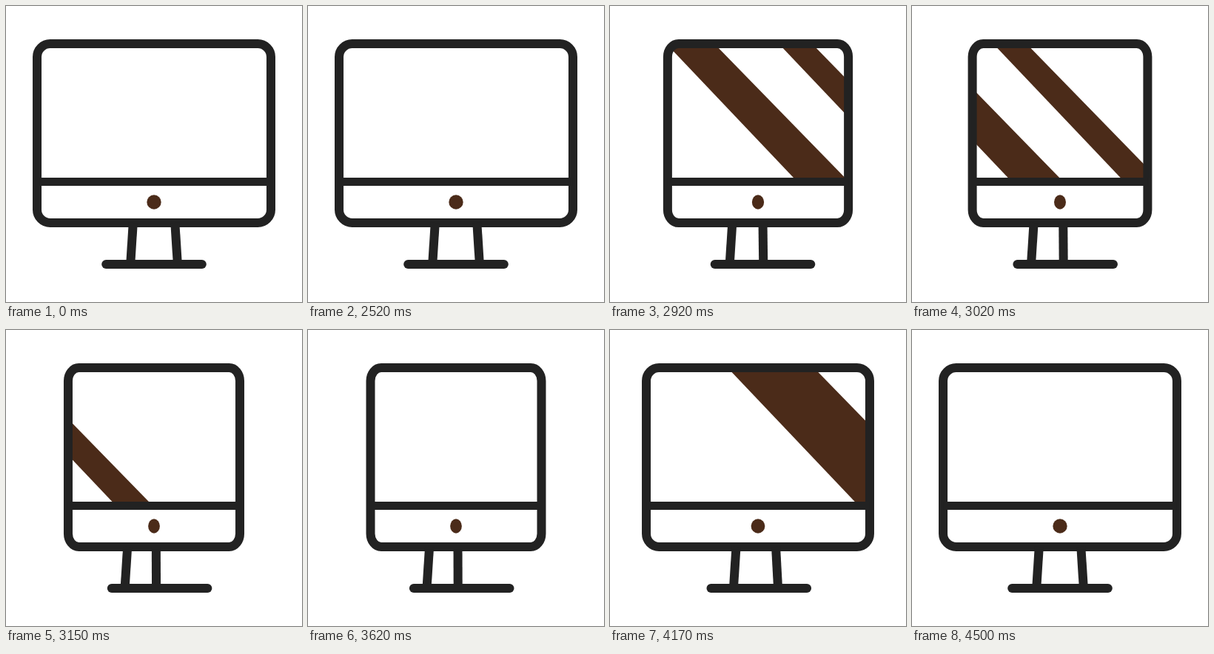
An HTML page with a canvas for the animation above (4520 ms loop, 400 by 400 pixels).

```html
<!DOCTYPE html>
<html>
<head>
<meta charset="utf-8">
<style>
html, body { margin: 0; width: 100%; height: 100%; overflow: hidden; background: #fff; }
canvas { display: block; width: 400px; height: 400px; }
</style>
</head>
<body>
<canvas id="stage" width="400" height="400"></canvas>
<script>
const ctx = document.getElementById('stage').getContext('2d');
const LOOP = 4520, DARK = '#222222', BROWN = '#4b2b19';
const TOP = 51, DIVIDER = 237.5, BOTTOM = 293, FOOT = 349;

const progress = (t, start, length) => Math.min(1, Math.max(0, (t - start) / length));
const smooth = s => s * s * (3 - 2 * s);
const mix = (a, b, k) => a + (b - a) * k;

// Quick start, long settle: cubic-bezier(.25, 0, .2, 1)
function settle(x) {
  let lo = 0, hi = 1;
  for (let i = 0; i < 24; i++) {
    const s = (lo + hi) / 2, r = 1 - s;
    if (.75 * r * r * s + .6 * r * s * s + s * s * s < x) lo = s; else hi = s;
  }
  return smooth(lo);
}

function line(x1, y1, x2, y2, width = 12, cap = 'butt') {
  ctx.lineWidth = width;
  ctx.lineCap = cap;
  ctx.beginPath();
  ctx.moveTo(x1, y1);
  ctx.lineTo(x2, y2);
  ctx.stroke();
}

// Diagonal glare; left is its x at the bottom of the screen (y = 232)
function stripe(left, width) {
  const edge = (x, slope, y) => [x + (y - 232) * slope, y];
  const right = left + width;
  ctx.beginPath();
  ctx.moveTo(...edge(left, .95, TOP));
  ctx.lineTo(...edge(right, .975, TOP));
  ctx.lineTo(...edge(right, .975, DIVIDER));
  ctx.lineTo(...edge(left, .95, DIVIDER));
  ctx.fill();
}

function draw(t) {
  const turn = settle(progress(t, 2520, 740)) - settle(progress(t, 3778, 740));
  const half = 158 - 42.5 * turn;
  const squeeze = 1 - .19 * turn;
  const left = 200 - half, right = 200 + half;
  const frame = () => {
    ctx.beginPath();
    ctx.roundRect(left, TOP, 2 * half, BOTTOM - TOP, { x: 17.8 * squeeze, y: 17.8 });
  };

  ctx.fillStyle = '#fff';
  ctx.fillRect(0, 0, 400, 400);

  ctx.fillStyle = BROWN;
  ctx.save();
  frame();
  ctx.clip();
  if (t > 2520 && t < 3400) {
    const x = mix(555, -128, smooth(progress(t, 2520, 860)));
    stripe(x, 69.5);
    stripe(x + 152, 49.5);
  } else if (t > 3660) {
    const x = mix(-44, 542, smooth(progress(t, 3660, 860)));
    stripe(x, 141 - .06 * x);
  }
  ctx.restore();

  ctx.beginPath();
  ctx.ellipse(200, 265, 9.7 * squeeze, 9.7, 0, 0, 2 * Math.PI);
  ctx.fill();

  ctx.strokeStyle = DARK;
  ctx.lineWidth = 12;
  frame();
  ctx.stroke();
  line(left, DIVIDER, right, DIVIDER, 11);

  const shift = 7.7 * turn;
  line(171.8 - shift, BOTTOM, 168.2 - shift, FOOT);
  line(228.3 - 25.8 * turn, BOTTOM, 231.9 - 29.2 * turn, FOOT);
  line(135.2 + shift, FOOT, 264.8 + shift, FOOT, 12, 'round');
}

const begin = performance.now();
function tick() {
  draw((performance.now() - begin) % LOOP);
  requestAnimationFrame(tick);
}
tick();
</script>
</body>
</html>
```
